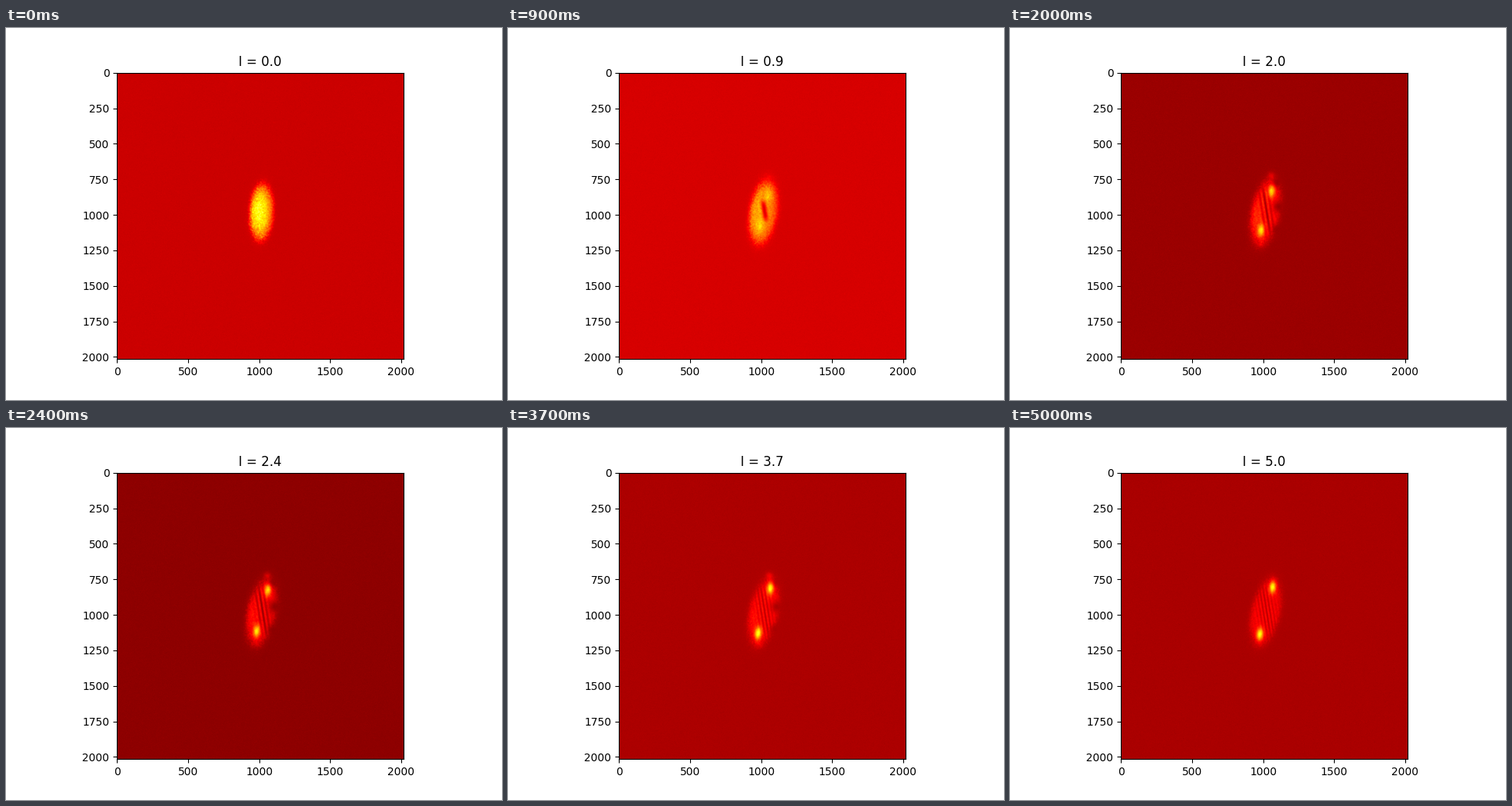
Recreate the animation shown at these times as a matplotlib script. Size 640 by 480 pixels, loop 5.1 s.

```python
import numpy as np
import matplotlib.pyplot as plt
from matplotlib.animation import FuncAnimation

FRAMES, STEP = 51, 100
N = 370          # image cells per side
SIZE = 2016      # extent in camera pixels

cells = (np.arange(N) + .5) * 369.6 / N
X, Y = np.meshgrid(143.2 + cells, 57.6 + cells)
DX, DY = X - 330, Y - 238


def blob(x, y, sx, sy, lean=0):
    dx, dy = X - x, Y - y
    return np.exp(-((dx + lean * dy) / sx) ** 2 / 2 - (dy / sy) ** 2 / 2)


def rise(c, scale, power=1):
    """Ease from 0 towards 1 as the current grows."""
    return 1 - np.exp(-(c / scale) ** power)


def grain(rng):
    """Slightly smoothed unit noise."""
    g = rng.standard_normal((N, N))
    g = g + np.roll(g, 1, 0)
    return (g + np.roll(g, 1, 1)) / 2


def background(c):
    return np.interp(c, [0, .9, 1.4, 3.1, 3.7, 5],
                     [.289, .306, .247, .163, .243, .239])


def fringes(c):
    """Dark stripes that start as one hole, then narrow and multiply."""
    u = DX - 1 - .16 * (DY + 2)
    span_y = max(4, 29 * rise(c, 1.3, 2))
    window = np.exp(-(u / (3 + 1.2 * c)) ** 2 / 2
                    - ((DY + 2) / span_y) ** 4 / 2)
    period = 4 + 8 / max(c, .5) ** 2
    depth = min(1, c / .9) * (.98 - .04 * c)
    return depth * window * (.5 + .5 * np.cos(2 * np.pi * u / period))


def body(c, notch, rng):
    on = rise(c, .8)
    side = (DX + (.04 + .13 * on) * DY) / (16 + 2.5 * on)
    r = np.hypot(side, DY / (37 + 4 * on)) + .03 * grain(rng)
    fill = 1 / (1 + np.exp(np.clip((r - 1) / .1, -50, 50)))
    dome = .15 + .4 * np.exp(-c / .5)
    light = fill * (1 - dome * np.minimum(r, 1.2) ** 2)
    light *= 1 - .3 * (1 - c / 5) * np.clip(side, -1, 1)
    light *= 1 - fringes(c)
    # Bites out of the right flank
    for x, y, s in ((347, 231, 5.5), (345, 261, 4.5), (344, 200, 4)):
        light *= 1 - notch * blob(x, y, s, s)
    return (.13 + .33 * np.exp(-c / 1.3)) * light * (1 + .06 * grain(rng))


def spots(c):
    """Two bright spots drifting apart along the cloud's axis."""
    gap = 14 + 18 * rise(c, 2)
    pair = sum(blob(330.7 + .27 * d, 236 - d, 3, 5.5, .08)
               for d in (gap, -gap))
    return .42 * rise(c, 1.7, 2) * pair


def cloud(i):
    c = i / 10
    rng = np.random.default_rng(100 + i)
    swing = abs(np.sin(np.pi * (c - .95) / 2.05))
    notch = min(1, c / .9) * min(1, 1.2 * swing)
    tail = blob(337, 191, 3, 3) + .5 * blob(324, 280, 4, 3)
    return (background(c) + .003 * rng.standard_normal((N, N))
            + body(c, notch, rng) + spots(c) + .09 * notch * tail)


fig, ax = plt.subplots(figsize=(6.4, 4.8), dpi=100)
image = ax.imshow(np.zeros((N, N)), cmap="hot", vmin=0, vmax=1,
                  interpolation="nearest",
                  extent=(-.5, SIZE - .5, SIZE - .5, -.5))
title = ax.set_title("I = 0.0")


def draw(i):
    image.set_data(cloud(i))
    title.set_text(f"I = {i / 10:.1f}")
    return image, title


anim = FuncAnimation(fig, draw, frames=FRAMES, interval=STEP,
                     repeat=True, repeat_delay=0)
plt.show()
```
